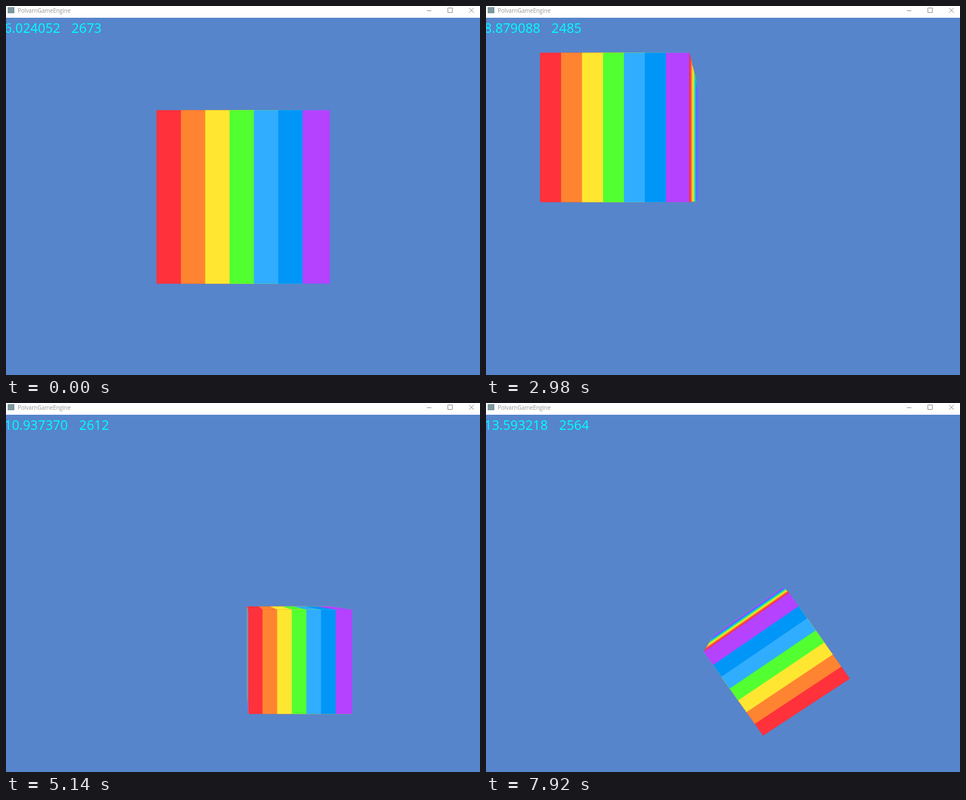
These frames come from a looping animation (848x660 px, 7.99 s). An HTML page with a canvas:

```html
<!DOCTYPE html>
<html lang="en">
<head>
<meta charset="utf-8">
<title>PolvarnGameEngine</title>
<style>
  html, body { margin: 0; width: 100%; height: 100%; overflow: hidden; background: #5685cb; }
  #stage { position: relative; width: 848px; height: 660px; overflow: hidden; }
  canvas, svg, .bar { position: absolute; left: 0; top: 0; }
  .bar { width: 848px; height: 21px; background: #fff; }
  .title { position: absolute; left: 21px; top: 1px; font: 10px/14px "Open Sans", "Noto Sans", sans-serif; color: #949494; }
  .icon { position: absolute; left: 3px; top: 2px; width: 12px; height: 11px; background: #7c979f; }
  .hud { position: absolute; left: -3px; top: 23px; font: 23.5px/32px "Open Sans", "Noto Sans", sans-serif; color: #0ff; }
  #rate { margin-left: 20px; }
</style>
</head>
<body>
<div id="stage">
  <canvas id="view" width="848" height="660"></canvas>
  <div class="bar">
    <div class="icon"></div>
    <div class="title">PolvarnGameEngine</div>
    <svg width="848" height="21" fill="none" stroke="#858585">
      <path d="M753 8.5h8M790.5 3.5h8v8h-8zM828.5 3.5l8.5 8.5M837 3.5l-8.5 8.5"/>
    </svg>
  </div>
  <div class="hud"><span id="clock"></span><span id="rate"></span></div>
</div>
<script>
const LOOP = 7990, STEPS = 115, STEP = LOOP / STEPS;
const FOCAL = 772.6, CX = 424.5, CY = 341.5;
const SPEED = 0.656; // cube widths per step
const COLORS = ['#ff313b', '#ff8431', '#ffe731', '#52ff31', '#31adff', '#0096f7', '#b542ff'];
const STRIPE = 0.1405;

const ctx = document.getElementById('view').getContext('2d');
const clockText = document.getElementById('clock');
const rateText = document.getElementById('rate');

const clamp = v => Math.min(1, Math.max(0, v));

function turn(a, b, angle) {
  const c = Math.cos(angle), s = Math.sin(angle);
  return [a * c - b * s, a * s + b * c];
}

function poseAt(step) {
  const slide = (start, by) => by * clamp((step - start) * SPEED / Math.abs(by));
  const ramp = (start, end) => clamp((step - start) / (end - start));
  const tilt = ramp(76, 92), roll = ramp(97, 114);
  return {
    x: slide(13, -1.75) + slide(24.85, 3.7) + slide(33.35, -2.677) + slide(58, 1.272),
    y: slide(42.29, 1.3) + slide(49, -1.95),
    z: 2.993 + slide(6, 0.401) + slide(64, 1.25),
    pitch: 0.98 * tilt - 1.045 * roll,
    yaw: -0.22 * tilt + 0.3 * roll,
    roll: 2.183 * roll
  };
}

function project([x, y, z], pose) {
  [x, y] = turn(x, y, pose.roll);
  [y, z] = turn(y, z, pose.pitch);
  [z, x] = turn(z, x, pose.yaw);
  const scale = FOCAL / (z + pose.z);
  return [CX + (x + pose.x) * scale, CY - (y + pose.y) * scale];
}

// Every face is the front one after quarter turns around y or x
function facePoint(s, t, aroundY, aroundX) {
  let x = s - 0.5, y = t - 0.5, z = -0.5;
  [x, z] = turn(x, z, aroundY * Math.PI / 2);
  [y, z] = turn(y, z, aroundX * Math.PI / 2);
  return [x, y, z];
}

function drawFace(aroundY, aroundX, pose) {
  const point = (s, t) => project(facePoint(s, t, aroundY, aroundX), pose);
  const o = point(0, 0), a = point(1, 0), b = point(0, 1), end = point(1, 1);
  const facing = (a[0] - o[0]) * (b[1] - o[1]) - (a[1] - o[1]) * (b[0] - o[0]);
  if (facing >= 0) return;
  // Each stripe reaches the far edge, so no gaps show between them
  COLORS.forEach((color, i) => {
    ctx.fillStyle = ctx.strokeStyle = color;
    ctx.beginPath();
    for (const p of [point(i * STRIPE, 0), a, end, point(i * STRIPE, 1)]) ctx.lineTo(...p);
    ctx.closePath();
    ctx.fill();
    ctx.stroke();
  });
}

function render(ms) {
  const step = Math.min(STEPS - 1, Math.floor(ms / STEP + 0.22));
  const pose = poseAt(step);

  ctx.fillStyle = '#5685cb';
  ctx.fillRect(0, 0, 848, 660);
  ctx.lineWidth = 0.4;
  for (let side = 0; side < 4; side++) drawFace(side, 0, pose);
  for (const lid of [-1, 1]) drawFace(0, lid, pose);

  // The frame rate settles once per second like a damped wave
  const seconds = 6.024052 + 7.569166 * step / (STEPS - 1);
  const tick = Math.floor(seconds + 0.01) - 6;
  clockText.textContent = seconds.toFixed(6);
  rateText.textContent = Math.round(2581 + 158 * Math.exp(-0.25 * tick) * Math.cos(1.08 * tick + 0.95));
}

const start = performance.now();
function frame() {
  render((performance.now() - start + 4) % LOOP);
  requestAnimationFrame(frame);
}
frame();
</script>
</body>
</html>
```
